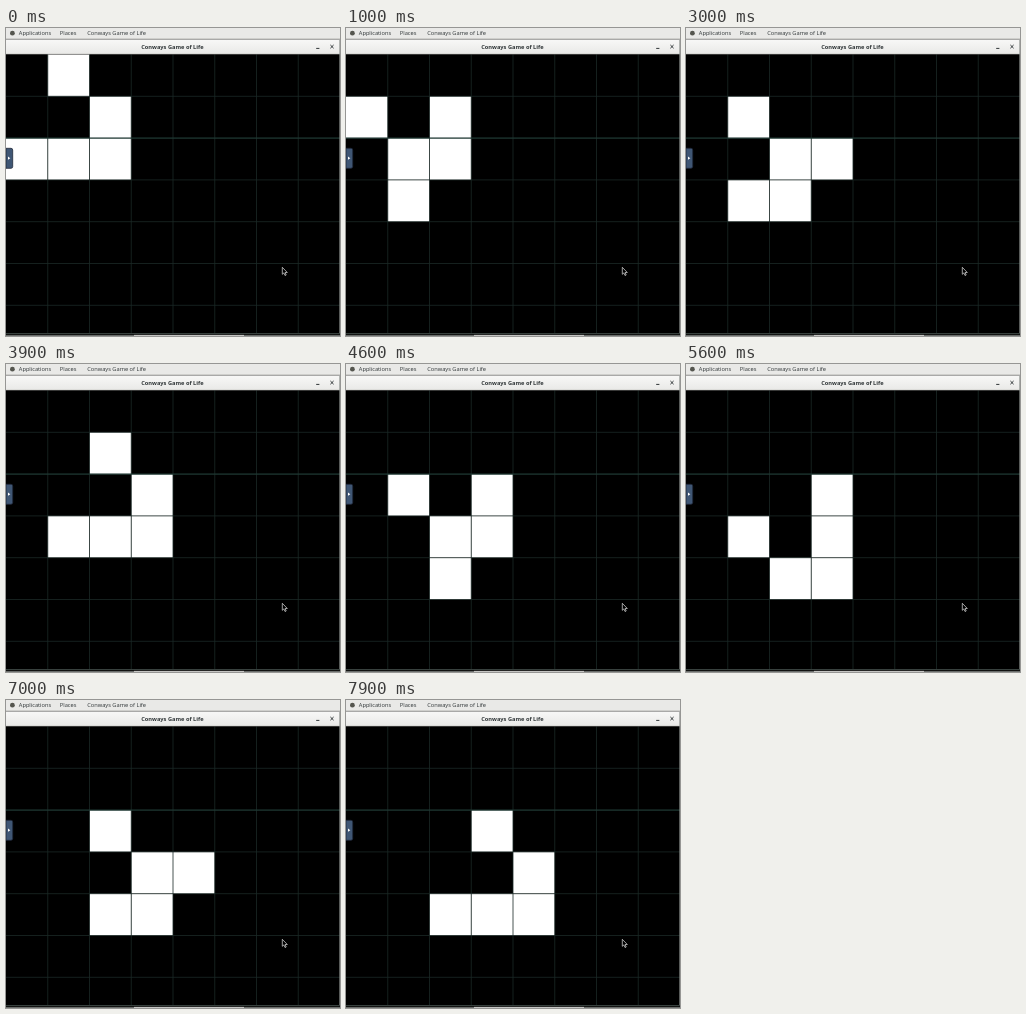
An HTML page for the animation above (8000 ms loop, 334x308 px).

```html
<!DOCTYPE html>
<html lang="en">
<head>
<meta charset="utf-8">
<title>Conways Game of Life</title>
<style>
  html, body { margin: 0; width: 100%; height: 100%; overflow: hidden; background: #000; }
  svg { display: block; width: 334px; height: 308px; }
  text { font: 5.7px "Open Sans", "Noto Sans", sans-serif; fill: #2e3436; }
  .title { font-weight: 700; }
</style>
</head>
<body>
<svg viewBox="0 0 334 308">
  <defs>
    <linearGradient id="bar" x2="0" y2="1">
      <stop stop-color="#f8f8f7"/><stop offset="1" stop-color="#e9e9e7"/>
    </linearGradient>
  </defs>
  <rect width="334" height="308"/>
  <g id="cells" fill="#fff"></g>
  <path id="lines" fill="none" stroke="#1b2926" stroke-width=".8"/>
  <path d="M0 110.1H334" stroke="#24423b" stroke-width=".8"/>

  <!-- top panel and title bar -->
  <rect width="334" height="11" fill="#e9e9e7"/>
  <path d="M0 11H334" stroke="#b4b4b0" stroke-width="1"/>
  <rect y="11.5" width="334" height="14.5" fill="url(#bar)"/>
  <path d="M0 26H334" stroke="#bdbdb9" stroke-width=".6"/>
  <circle cx="6.4" cy="5.2" r="2.4" fill="#55564f"/>
  <text x="12.8" y="7.1">Applications</text>
  <text x="53.8" y="7.1">Places</text>
  <text x="81.2" y="7.1">Conways Game of Life</text>
  <text class="title" x="135.2" y="20.7">Conways Game of Life</text>
  <path d="M310.2 20.4h3.2M324.4 17l3.2 3.2m0-3.2l-3.2 3.2" stroke="#2e3436" stroke-width="1"/>

  <!-- window edges -->
  <path d="M333.6 12V305" stroke="#8d918e" stroke-width=".7"/>
  <path d="M0 305.6H334" stroke="#4f5b57" stroke-width=".8"/>
  <path d="M0 307.4H334" stroke="#777a78" stroke-width="1"/>
  <path d="M128 307.4H238" stroke="#d0d0ce" stroke-width="1"/>

  <!-- side tab -->
  <path d="M0 120.3H5Q6.7 120.3 6.7 122V138.6Q6.7 140.3 5 140.3H0Z" fill="#3f5674" stroke="#20293a" stroke-width=".8"/>
  <path d="M2 128.6L4.3 130.2L2 131.8Z" fill="#fff"/>

  <!-- pointer -->
  <path d="M276.3 239.3V246.3L277.9 244.9L279 247.5L280.2 247L279.1 244.5H281.3Z" fill="#000" stroke="#e4e4e4" stroke-width=".7"/>
</svg>
<script>
const COLS = 8, ROWS = 7, W = 41.75, H = 41.8, TOP = 26.5, LOOP = 8000;
const STEPS = [600, 1600, 2600, 3700, 4600, 5600, 6600, 7600];
const SVG_NS = "http://www.w3.org/2000/svg";

const size = COLS * ROWS;
const start = Array(size).fill(0);
for (const [x, y] of [[1, 0], [2, 1], [0, 2], [1, 2], [2, 2]]) start[y * COLS + x] = 1;

function evolve(grid) {
  return grid.map((alive, i) => {
    const cx = i % COLS, cy = Math.floor(i / COLS);
    let near = -alive;
    for (let y = Math.max(0, cy - 1); y <= Math.min(ROWS - 1, cy + 1); y++)
      for (let x = Math.max(0, cx - 1); x <= Math.min(COLS - 1, cx + 1); x++)
        near += grid[y * COLS + x];
    return +(near === 3 || (alive && near === 2));
  });
}

const generations = [start];
for (const _ of STEPS) generations.push(evolve(generations.at(-1)));

const cells = start.map((_, i) => {
  const rect = document.createElementNS(SVG_NS, "rect");
  const attrs = { x: (i % COLS) * W, y: TOP + Math.floor(i / COLS) * H, width: W, height: H };
  for (const key in attrs) rect.setAttribute(key, attrs[key]);
  return document.getElementById("cells").appendChild(rect);
});

let grid = "";
for (let c = 1; c < COLS; c++) grid += `M${c * W} ${TOP}V305`;
for (let r = 1; r < ROWS; r++) grid += `M0 ${TOP + r * H}H334`;
document.getElementById("lines").setAttribute("d", grid);

let shown = -1;
function draw() {
  const time = performance.now() % LOOP;
  const index = STEPS.filter(t => t <= time).length;
  if (index !== shown) {
    shown = index;
    cells.forEach((cell, i) => cell.setAttribute("visibility", generations[index][i] ? "visible" : "hidden"));
  }
  requestAnimationFrame(draw);
}
draw();
</script>
</body>
</html>
```
